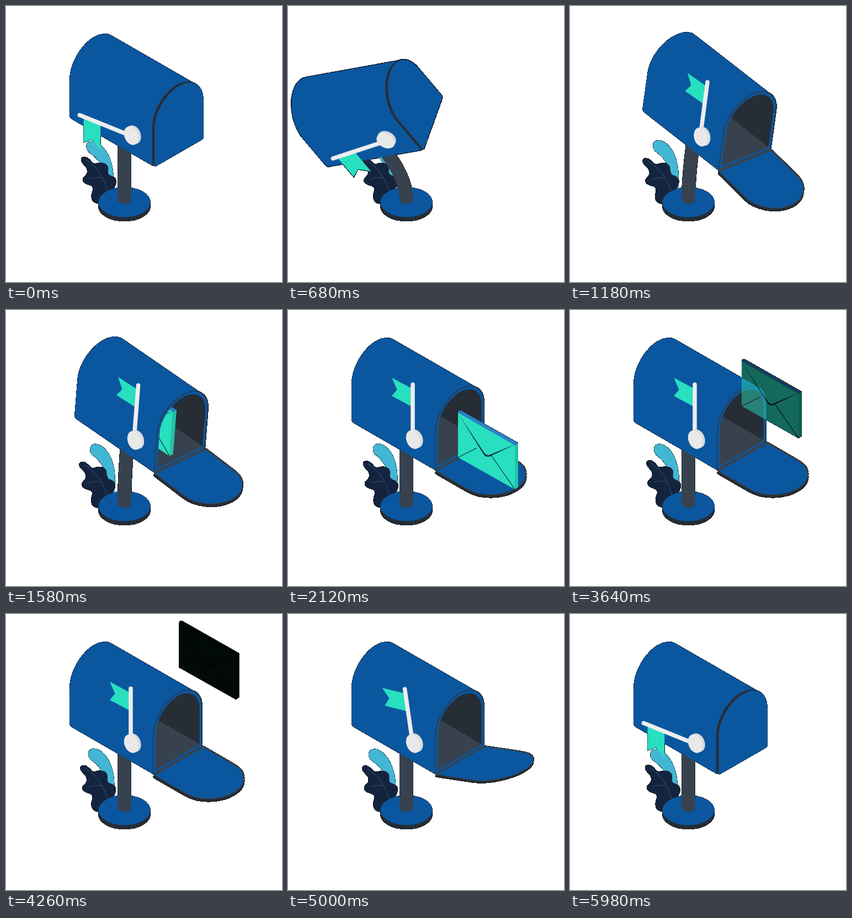
Recreate the animation shown at these times as an HTML page. Size 500 px wide and 500 px high, loop 6.02 s.

```html
<!DOCTYPE html>
<html>
<head>
<meta charset="utf-8">
<style>
html, body { margin: 0; width: 100%; height: 100%; overflow: hidden; background: #fff; }
svg { display: block; width: 500px; height: 500px; }
.blue { fill: #0a57a0; }
.dark { fill: #262d35; stroke: #262d35; }
.grey { fill: #37424e; stroke: #37424e; }
</style>
</head>
<body>
<svg viewBox="0 0 500 500">
  <defs>
    <!-- arch in face units: x along the hinge, y away from it -->
    <path id="arch" vector-effect="non-scaling-stroke" stroke-linejoin="round"
      d="M3 0Q0 0 0 3V70A50.8 50.8 0 0 0 101.6 70V3Q101.6 0 98.6 0Z"/>
    <path id="hole" d="M5 5V70A45.8 45.8 0 0 0 96.6 70V5Z"/>
    <linearGradient id="inside" gradientUnits="userSpaceOnUse" x1="0" y1="0" x2="102.5" y2="102.5">
      <stop offset=".5" stop-color="#37424e"/>
      <stop offset=".5" stop-color="#262d35"/>
    </linearGradient>
    <clipPath id="front">
      <use href="#hole" transform="matrix(.866 -.5 0 -1 267 290)"/>
      <rect x="307" y="-100" width="300" height="600"/>
    </clipPath>
    <!-- soft edges and fades darken to black -->
    <filter id="matte" filterUnits="userSpaceOnUse" x="0" y="0" width="500" height="500" color-interpolation-filters="sRGB">
      <feColorMatrix values="0 0 0 0 0  0 0 0 0 0  0 0 0 0 0  0 0 0 40 0" result="black"/>
      <feMerge><feMergeNode in="black"/><feMergeNode in="SourceGraphic"/></feMerge>
    </filter>
  </defs>

  <g filter="url(#matte)">
    <path id="paleLeaf" fill="#42b7d4"
      d="M198 315C202 275 185 244 165 242C154 242 152 254 159 262C172 272 180 285 186 305L189 335H197Z"/>
    <g id="darkLeaf">
      <path fill="#14243e" d="M136 278C137 272 145 272 150 277C156 281 156 287 164 285C174 282 183 284 185 292C186 299 182 304 190 307C199 310 202 317 198 325C195 331 194 336 192 342L168 358C158 357 154 351 155 342C156 335 161 329 153 325C146 323 139 320 139 314C140 308 149 307 147 297C146 289 136 286 136 278Z"/>
      <path fill="none" stroke="#26476c" stroke-width="1.2" d="M145 279C165 290 180 315 185 340M150 313Q162 309 174 311"/>
    </g>

    <path fill="#262d35" d="M167.500 356V363A47 27 0 0 0 261.500 363V356Z"/>
    <ellipse class="blue" cx="214.5" cy="355.500" rx="47" ry="27"/>
    <ellipse fill="#37424e" cx="214.5" cy="352" rx="12.3" ry="6.500"/>
    <path id="pole" fill="none" stroke="#37424e" stroke-width="24.6"/>

    <g id="box">
      <use href="#arch" class="blue" transform="matrix(.866 -.5 0 -1 115.5 202.5)"/>
      <path class="blue" d="M342 140.600L190 53L115.500 140V198Q115.500 202 119 204.500L267 290L320 260Z"/>
      <g transform="matrix(.866 -.5 0 -1 267 290)">
        <use href="#arch" class="blue" stroke="#2c3a49" stroke-width="1.7"/>
        <use href="#hole" fill="url(#inside)"/>
      </g>

      <use id="doorBack" href="#arch" class="dark"/>
      <use id="doorEdge" href="#arch" class="grey"/>
      <use id="doorFace" href="#arch" class="blue"/>

      <g clip-path="url(#front)">
        <g id="letter">
          <path fill="#2b80c2" d="M308 187Q308 181 314 182.500L417 241L411 246Z"/>
          <path fill="#20c3a8" d="M411 245L417 241V321L411 325Z"/>
          <path fill="#28dfc0" d="M308 186L411 245V325L308 267Z"/>
          <path fill="#10343f" d="M308 187L355 258Q360 265 366 262L415 242L366 265Q359 268 354 261Z"/>
          <path fill="none" stroke="#10343f" stroke-width="1.3" d="M308 267L342 250M411 325L368 263"/>
        </g>
      </g>

      <path id="banner" fill="#28dfc0"/>
      <path id="rod" stroke="#ededed" stroke-width="7.5" stroke-linecap="round"/>
      <g transform="rotate(-22 229 234)">
        <ellipse fill="#dcdcde" cx="231.500" cy="234" rx="12.500" ry="17.500"/>
        <ellipse fill="#e9e9ea" cx="226.500" cy="234" rx="12" ry="17.500"/>
      </g>
    </g>
  </g>
</svg>
<script>
const LOOP = 6020, RAD = Math.PI / 180;
const el = id => document.getElementById(id);
const set = (id, attrs) => { for (const k in attrs) el(id).setAttribute(k, attrs[k]); };
const mix = (a, b, p) => a + (b - a) * p;

// Eased value through [time, value] keys
function ease(t, keys) {
  if (t <= keys[0][0]) return keys[0][1];
  for (let i = 1; i < keys.length; i++) {
    const [t0, a] = keys[i - 1], [t1, b] = keys[i];
    if (t < t1) {
      const u = (t - t0) / (t1 - t0);
      return mix(a, b, u * u * (3 - 2 * u));
    }
  }
  return keys[keys.length - 1][1];
}

const LEAN = [[0, 0], [720, -40.5], [1045, 20], [1350, -8.7], [1610, 5], [1860, 0]];
const DOOR = [[740, -90], [1040, 80], [1200, 35], [1350, 20], [1600, 33], [1840, 30], [4805, 30], [5532, -90]];
const FLAG = [[720, 68], [1030, -6], [1180, 0.5], [1320, 0], [4845, 0], [5560, 68]];
const SWAY = [[0, 0], [1180, -3.4], [3050, 3.4], [4630, -1.8], [LOOP, 0]];

function drawBox(lean) {
  set('box', { transform: `rotate(${lean} 215 308)` });
  const r = lean * RAD;
  const x = 214.5 + 70 * Math.sin(r), y = 308 - 70 * Math.cos(r);
  set('pole', { d: `M214.5 352Q214.5 308 ${x} ${y}` });
}

// The open door shows its edge around a slightly smaller face
function drawDoor(angle) {
  const open = Math.min(1, (angle + 90) / 120), shut = 1 - open;
  const c = Math.cos(angle * RAD), s = Math.sin(angle * RAD);
  const place = (dx, dy, wide, long) => {
    const w = mix(1, wide, open), l = mix(1, long, open);
    return `matrix(${0.866 * w} ${-0.5 * w} ${c * l} ${s * l} ${267 + 2.5 * shut + dx} ${290 + 1.2 * shut + dy})`;
  };
  const gap = 4 * open, stroke = 3 * open;
  set('doorBack', { transform: place(-4.5 * shut, mix(-2.2, 5, open), 1, 0.965), 'stroke-width': stroke });
  set('doorEdge', { transform: place(0, 0, 1, 0.965), 'stroke-width': stroke });
  set('doorFace', { transform: place(c * gap, s * gap, 0.985, 0.932) });
}

function drawFlag(angle) {
  const a = angle * RAD, e = (28 - 1.73 * angle) * RAD, len = 43 + angle * 0.06;
  const on = d => [226 - d * Math.sin(a), 235 - d * Math.cos(a)];
  const out = ([x, y], k = 1) => [x - k * len * Math.cos(e), y - k * len * Math.sin(e)];
  const top = on(92), low = on(59);
  set('banner', { d: `M${[top, out(top), out(on(75.5), 0.75), out(low), low].join('L')}Z` });
  set('rod', { d: `M226 235L${on(100)}` });
}

function drawLetter(t) {
  const slide = ease(t, [[1350, -155], [2080, 0]]);
  const rise = ease(t, [[2840, 0], [4360, 1]]);
  set('letter', {
    transform: `translate(${slide + 5.5 * rise} ${slide * 0.563 - 172 * rise})`,
    opacity: 1 - 0.97 * rise,
    display: t > 1300 && t < 4340 ? 'inline' : 'none'
  });
}

function frame() {
  const t = performance.now() % LOOP;
  const pale = 3 * Math.cos(2 * Math.PI * (t - 2600) / LOOP) - 3;
  set('paleLeaf', { transform: `rotate(${pale} 190 345)` });
  set('darkLeaf', { transform: `rotate(${ease(t, SWAY)} 180 356)` });
  drawBox(ease(t, LEAN));
  drawDoor(ease(t, DOOR));
  drawFlag(ease(t, FLAG));
  drawLetter(t);
  requestAnimationFrame(frame);
}
frame();
</script>
</body>
</html>
```
